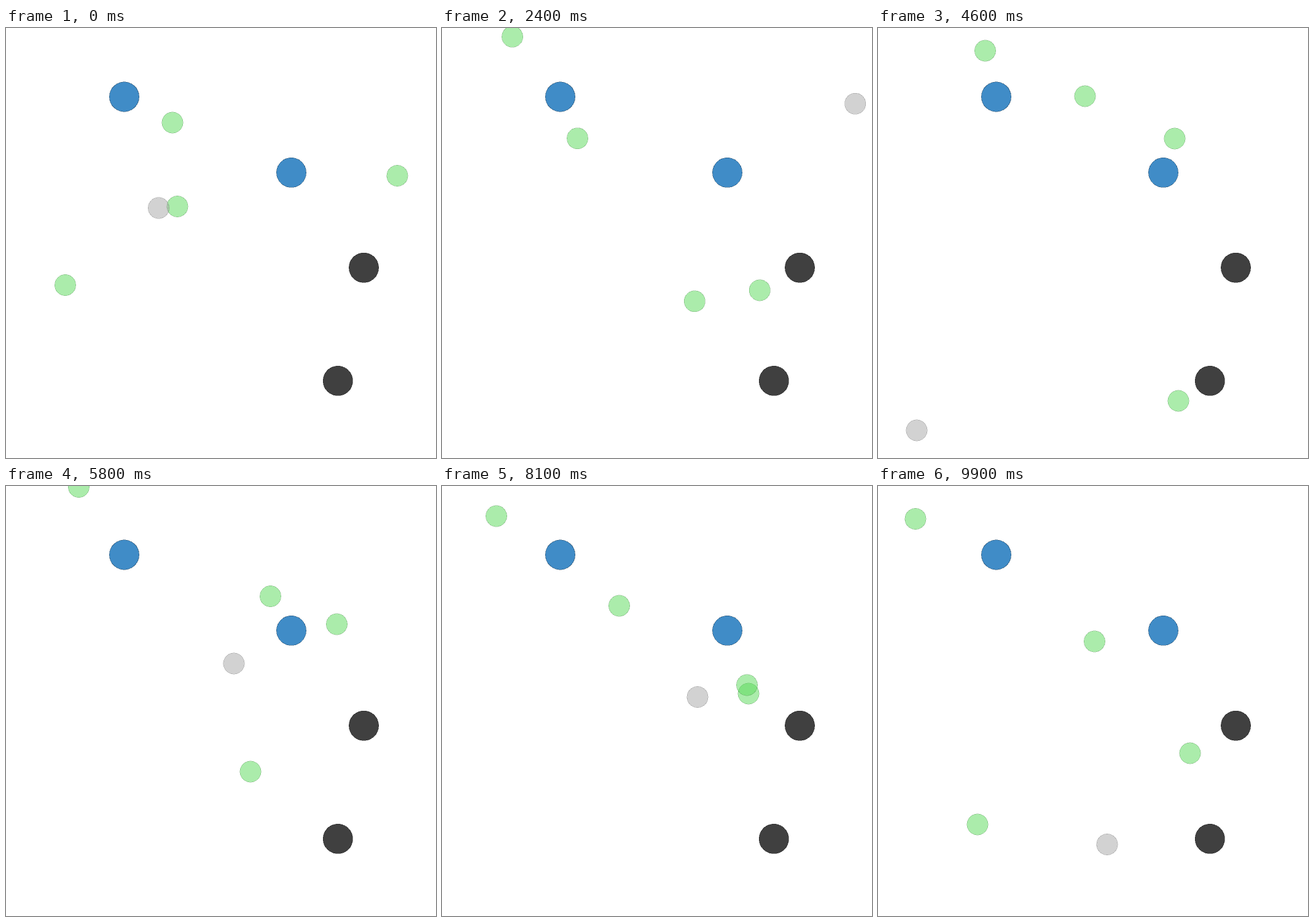
An HTML page that plays this animation: 700x700 px, repeating every 10 s.

```html
<!DOCTYPE html>
<html lang="en">
<head>
<meta charset="utf-8">
<title>Roaming discs</title>
<style>
  html, body { margin: 0; width: 100%; height: 100%; overflow: hidden; background: #fff; }
  svg { display: block; width: 100%; height: 100%; shape-rendering: crispEdges; }
</style>
</head>
<body>
<svg id="stage" viewBox="0 0 700 700"></svg>
<script>
const STEP = 100, STEPS = 100, SIDES = 30;
const ROCK_RADIUS = 24.2, MOVER_RADIUS = 17.2;
const CLEARANCE = ROCK_RADIUS + MOVER_RADIUS;
const GREEN = [89, 217, 89], GRAY = [165, 165, 165];
const BLUE = [64, 140, 199], DARK = [64, 64, 64];
const stage = document.getElementById('stage');

const rocks = [
  { x: 192.5, y: 112, color: BLUE },
  { x: 464.5, y: 235.4, color: BLUE },
  { x: 582.5, y: 390.2, color: DARK },
  { x: 540.3, y: 574.4, color: DARK }
];

// Green discs share their waypoint steps; the gray one makes three detours.
const strollSteps = [0, 15, 33, 46, 58, 81, 99];
const chaseSteps = [...strollSteps, 23, 69, 89].sort((a, b) => a - b);
const movers = [
  { color: GREEN, steps: strollSteps,
    stops: [[279, 290.5], [117, 34], [132, 20.5], [174.5, 37], [118.5, 1.5], [88.5, 49], [61, 53.5]] },
  { color: GREEN, steps: strollSteps,
    stops: [[271, 154], [270, 129], [186, 222], [337, 111], [430.5, 179.5], [288.5, 195], [352.5, 253]] },
  { color: GREEN, steps: strollSteps,
    stops: [[637, 240.5], [478, 397.5], [564.5, 457], [489, 607], [398, 465], [499, 338], [162, 551]] },
  { color: GREEN, steps: strollSteps,
    stops: [[96.5, 418.5], [302.5, 415], [500, 448], [483, 180], [538.5, 225], [496.5, 324], [508, 435]] },
  { color: GRAY, steps: chaseSteps,
    stops: [[248.5, 293], [532, 36], [685, 110], [369, 318], [63, 655], [371, 289],
            [600, 575], [416, 343.5], [440, 660], [373, 583.5]] }
];

function addDisc(radius, color, alpha) {
  const points = Array.from({ length: SIDES }, (_, i) => {
    const angle = 2 * Math.PI * i / SIDES;
    return [Math.cos(angle), Math.sin(angle)].map(c => (radius * c).toFixed(2));
  });
  const disc = document.createElementNS('http://www.w3.org/2000/svg', 'polygon');
  const attributes = {
    points: points.join(' '),
    fill: `rgb(${color})`,
    'fill-opacity': alpha,
    stroke: `rgb(${color.map(c => c / 2)})`,
    'stroke-opacity': alpha / 2
  };
  for (const name in attributes) disc.setAttribute(name, attributes[name]);
  return stage.appendChild(disc);
}

function place(disc, x, y) {
  disc.setAttribute('transform', `translate(${x.toFixed(2)} ${y.toFixed(2)})`);
}

// Softened tangent through the neighbouring stops.
function slope({ steps, stops }, i, axis) {
  const a = Math.max(i - 1, 0), b = Math.min(i + 1, steps.length - 1);
  return 0.7 * (stops[b][axis] - stops[a][axis]) / (steps[b] - steps[a]);
}

function positionAt(mover, step) {
  const { steps, stops } = mover;
  const next = steps.findIndex(s => s >= step) || 1, i = next - 1;
  const span = steps[next] - steps[i];
  const u = (step - steps[i]) / span, v = 1 - u;
  return [0, 1].map(axis =>
    v * v * (1 + 2 * u) * stops[i][axis] + u * u * (3 - 2 * u) * stops[next][axis] +
    span * u * v * (v * slope(mover, i, axis) - u * slope(mover, next, axis)));
}

// Movers slide around the fixed discs instead of crossing them.
function keepClear([x, y]) {
  for (const rock of rocks) {
    const dx = x - rock.x, dy = y - rock.y;
    const push = Math.max(1, CLEARANCE / Math.hypot(dx, dy));
    x = rock.x + dx * push;
    y = rock.y + dy * push;
  }
  return [x, y];
}

for (const { x, y, color } of rocks) place(addDisc(ROCK_RADIUS, color, 1), x, y);
for (const mover of movers) mover.disc = addDisc(MOVER_RADIUS, mover.color, 0.5);

function render(time) {
  const step = Math.floor(time / STEP) % STEPS;
  for (const mover of movers) place(mover.disc, ...keepClear(positionAt(mover, step)));
}

const start = performance.now();
function tick() {
  render(performance.now() - start);
  requestAnimationFrame(tick);
}
tick();
</script>
</body>
</html>
```
